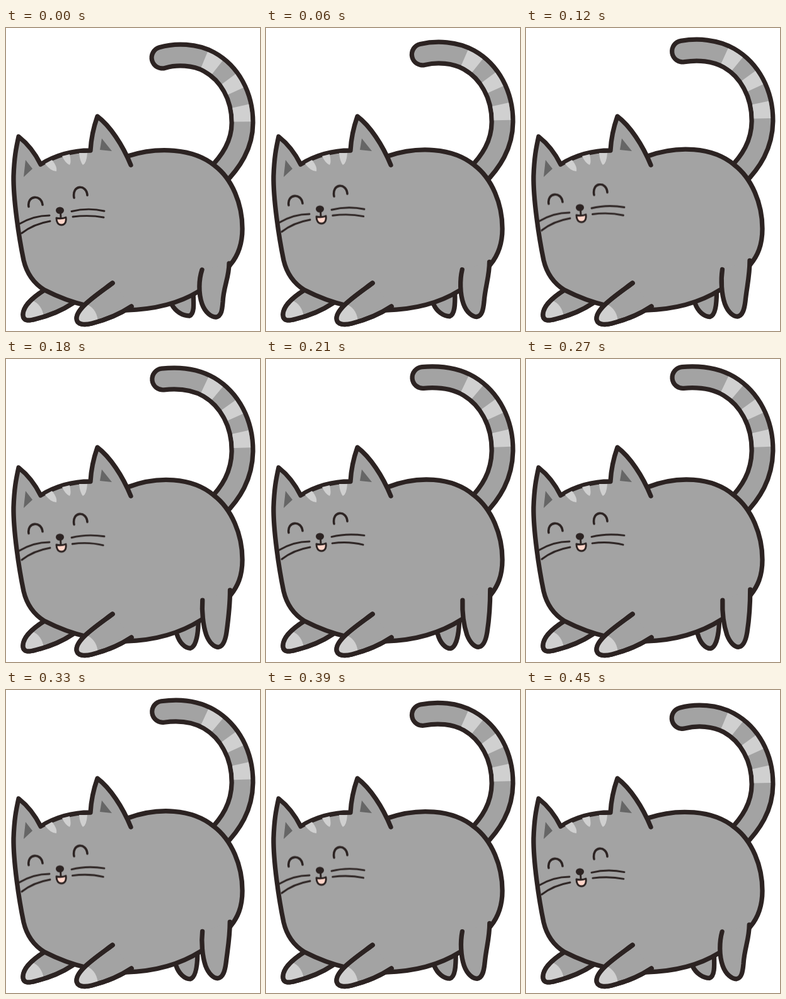
Animation, 403 px wide and 480 px high, one loop 0.48 s. Source, as an HTML page:

```html
<!DOCTYPE html>
<html lang="en">
<head>
<meta charset="utf-8">
<title>Happy cat</title>
<style>
  html, body { margin: 0; width: 100%; height: 100%; overflow: hidden; background: #fff; }
  svg { display: block; width: 403px; height: 480px; }

  .line { fill: #a3a3a3; stroke: #2c2322; stroke-width: 7.3; stroke-linecap: round; stroke-linejoin: round; }
  .thin { fill: none; stroke: #2c2322; stroke-width: 2.9; stroke-linecap: round; stroke-linejoin: round; }
  .eye { stroke-width: 3.6; }
  .light { fill: #d0d0d0; }
  .dark { fill: #666; }
  .open { fill: none; }

  /* Eight hard steps up, eight back down */
  .tail, .body, .near, .far, .face, .whiskers { animation: 480ms steps(8) infinite; }
  .tail { animation-name: tail; fill: none; }
  .body { animation-name: body; }
  .near { animation-name: near; }
  .far { animation-name: far; }
  .face { animation-name: face; }
  .whiskers { animation-name: whiskers; }

  .rim { stroke: #2c2322; stroke-width: 41; stroke-linecap: round; }
  .fur { stroke: #a3a3a3; stroke-width: 26.5; stroke-linecap: round; }
  .rings { stroke: #d0d0d0; stroke-width: 26.5; stroke-dasharray: 0 68 24 26 22 25 25 999; }

  @keyframes tail {
    0%, 100% { d: path("M248 47C270 40.5 300 41.500 322 53.500C355 71.500 375 108 375 150C375 185 357 212 333 236"); }
    50% { d: path("M249 27C275 25.500 300 28.500 322 41.500C355 61.500 375.500 100 375 145C374 185 357 212 333 236"); }
  }
  @keyframes body {
    0%, 100% { d: path("M193 203C240 188 297 190 331 218C359 239 375 279 375 318C375 345 367 362 356 375L335 398L306 417C275 436 235 446 190 447C150 446 110 440 61 415C40 402 32 385 28 368C20 330 11.500 270 12 235C13 205 16 190 20 172C34 183 46 198 55 216C78 202 105 194 134 194C135 175 139 157 145 140C165 155 185 185 198 217"); }
    50% { d: path("M193 203C240 184 295 186 329 215C358 237 375 278 375 318C375 345 367 360 357 373L335 398L311 412C275 435 235 446 190 447C150 446 110 440 61 415C40 402 32 385 28 368C20 330 11.500 270 12 235C13 205 16 190 20 172C34 183 46 198 55 216C78 202 105 194 134 194C135 175 139 157 145 140C165 155 185 185 198 217"); }
  }
  @keyframes near {
    0%, 100% { d: path("M311 383C306 398 305 420 311 437C316 451 326 458 333 458C342 457 343 446 344 434C345 410 354 395 354 373"); }
    50% { d: path("M312 382C312 400 315 422 320 437C325 450 332 456 338 456C346 455 350 444 352 432C356 408 356 390 356 364"); }
  }
  @keyframes far {
    0%, 100% { d: path("M263 438C269 449 280 456 291 456C299 453 298 438 297 420"); }
    50% { d: path("M274 436C277 449 285 459 293 459C302 457 307 438 308 415"); }
  }
  @keyframes face {
    0%, 100% { transform: translateY(0); }
    50% { transform: translateY(-9px); }
  }
  @keyframes whiskers {
    0%, 100% { d: path("M104 290.500C122 286 139 286 156 290M106 299C122 297 139 297 155 300"); }
    50% { d: path("M104 289.500C122 285 139 285 156 287M105 300C122 297.500 139 298.500 154 302.500"); }
  }
</style>
</head>
<body>
<svg viewBox="0 0 403 480">
  <defs>
    <path id="leftLeg" d="M61 415C45 425 27 440 27 454C27 465 36 464 47 461C68 456 88 448 106 436"/>
    <path id="rightLeg" d="M169 404C148 420 112 443 112 460C112 470 124 471 136 468C160 462 181 453 199 441"/>
  </defs>

  <path class="tail rim"/>
  <path class="tail fur"/>
  <path class="tail rings"/>

  <path class="line far"/>

  <use href="#leftLeg" class="line"/>
  <path class="light" d="M40 431C52 435 58 445 60 457L45 461L28 460L28 448Z"/>
  <use href="#leftLeg" class="line open"/>

  <path class="line body"/>

  <path class="dark" d="M31 209L42 223L28 236ZM152 175L168 195L149 193Z"/>
  <path class="light" d="M62 215L73 209Q82 220 80 227Q71 227 62 215ZM89 203L101 200Q104 213 101 217Q94 214 89 203ZM116 198L129 198Q128 214 122 217Q117 211 116 198Z"/>

  <path class="line near"/>

  <use href="#rightLeg" class="line"/>
  <path class="light" d="M125 436C137 441 144 449 146 464L130 468L114 466L113 455Z"/>
  <use href="#rightLeg" class="line open"/>

  <g class="face">
    <path class="thin eye" d="M36 283C33 265 56 263 58 280M108 269C104 248 128 247 129 265"/>
    <path class="thin" d="M69 297C50 297 35 302 20 311M70 306C52 309 38 315 25 325"/>
    <path class="thin whiskers"/>
    <ellipse cx="85.500" cy="289" rx="6.500" ry="5.500" fill="#2c2322"/>
    <path class="thin" d="M86.500 292L87 301"/>
    <path class="thin" style="fill:#ffd5c9" d="M80 301Q88 303 95 300C96 308 93 312 88 312C83 312 80 308 80 301Z"/>
  </g>
</svg>
</body>
</html>
```
